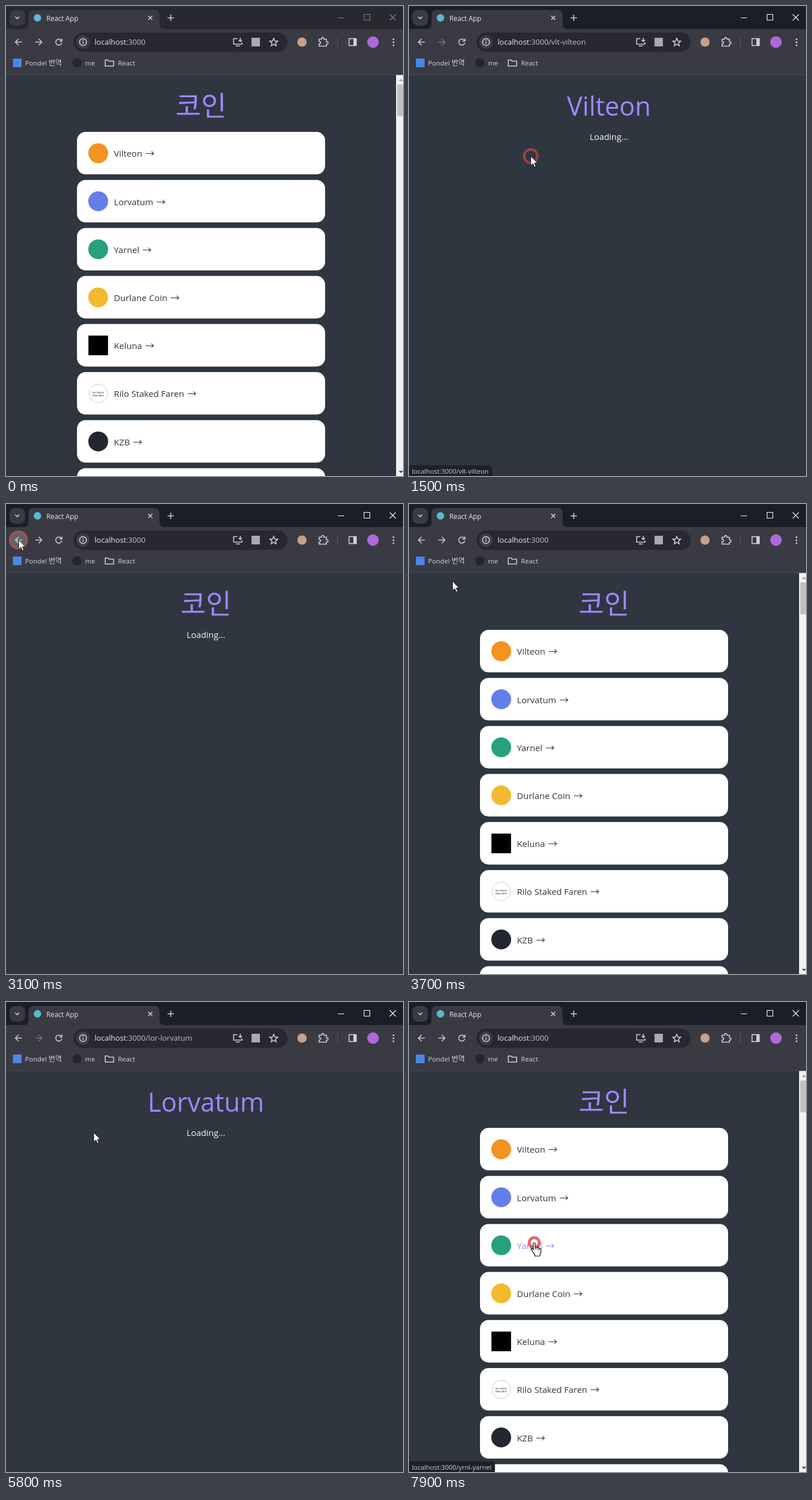
Animation of 688x814 px, one loop 8 s. Source, as an HTML page:

```html
<!DOCTYPE html>
<html lang="ko">
<head>
<meta charset="utf-8">
<title>React App</title>
<style>
html, body { margin: 0; width: 100%; height: 100%; overflow: hidden; background: #2f3640; }
svg { display: block; }
text { font-family: "Open Sans", "Noto Sans CJK KR", "Noto Sans CJK JP", sans-serif; }
.arrow { font-family: "Noto Sans CJK KR", "Noto Sans CJK JP", sans-serif; font-size: 16px; }
.line { fill: none; stroke: #d0d1d8; stroke-width: 1.6; }
.mid { text-anchor: middle; }
</style>
</head>
<body>
<svg width="688" height="814" viewBox="0 0 688 814">
  <rect width="688" height="814" fill="#2f3640"/>

  <g id="list">
    <g id="cards"></g>
    <rect x="676" y="119" width="17" height="695" fill="#f1f1f1"/>
    <rect x="678" y="136" width="13" height="55" fill="#c1c1c1"/>
    <path d="M680.5 130l4-4 4 4z" fill="#a3a3a3"/>
    <path d="M680.5 805l4 4 4-4z" fill="#505050"/>
  </g>
  <text id="head" class="mid" y="190" fill="#9c88ff"></text>
  <text id="loading" class="mid" x="346.5" y="232" font-size="14.9" fill="#f5f6fa">Loading...</text>

  <!-- tab strip -->
  <rect id="strip" width="688" height="41"/>
  <rect x="6" y="7" width="27" height="27" rx="9" fill="#3a3a43"/>
  <path class="line" d="M16 18.5l3.5 3.5 3.5-3.5"/>
  <path d="M30 40q9 0 9-9V16q0-9 9-9H257q9 0 9 9V31q0 9 9 9z" fill="#3a3a43"/>
  <circle cx="54.5" cy="20.5" r="6.5" fill="#58b9d3"/>
  <text x="70" y="26" font-size="11.8" fill="#e6e6ea">React App</text>
  <path class="line" d="M246.5 17l7 7m0-7l-7 7M280 20.5h11M285.5 15v11"/>
  <path id="winbuttons" d="M575 20.5h11M620.5 14.5h10v10h-10zM665 14.5l10.5 10.5m0-10.5l-10.5 10.5" fill="none" stroke-width="1.1"/>

  <!-- toolbar -->
  <rect y="40" width="688" height="79" fill="#3a3a43"/>
  <rect y="118.5" width="688" height="1" fill="#4a4b55"/>
  <circle id="backhover" cx="21.5" cy="62.5" r="16.5" fill="#62636b"/>
  <path class="line" d="M27.5 62.5h-11M21.8 57l-5.5 5.5 5.5 5.5"/>
  <path class="line" id="forward" d="M51 62.5h11M56.7 57l5.5 5.5-5.5 5.5"/>
  <path class="line" d="M95.7 59.2a5.3 5.3 0 1 0 1 4.5M97 56.5v4.3h-4.5"/>
  <rect x="117" y="46" width="371" height="33.5" rx="16.7" fill="#272831"/>
  <circle cx="133.5" cy="62.5" r="11.5" fill="#3d3e48"/>
  <g class="line">
    <circle cx="133.5" cy="62.5" r="6"/>
    <path d="M133.5 61.7v4M133.5 58.8v1.6"/>
    <path d="M401 56.5h-6.5v9.5h14.5v-3M398 69.2h7.5M406 55v6.5m-3-2.8l3 3 3-3"/>
    <path d="M464 56l2 4.5 4.8.4-3.7 3.2 1.1 4.8-4.2-2.5-4.2 2.5 1.1-4.8-3.7-3.2 4.8-.4z"/>
    <path d="M542.5 57.5h4.3a2.2 2.2 0 1 1 4.2 0h4.3v4.3a2.2 2.2 0 1 1 0 4.2v3.5h-12.8v-3.8a2.2 2.2 0 1 0 0-4.2z"/>
    <rect x="594.5" y="56.5" width="12.5" height="12"/>
    <path d="M172 93.5h5l1.5 2h8v8.5h-14.5z"/>
  </g>
  <text x="153.5" y="67.3" font-size="13.1" fill="#ececf0">localhost<tspan id="url" fill="#bfc0c8"></tspan></text>
  <rect x="425.5" y="55" width="14.5" height="15" fill="#a9aab2"/>
  <circle cx="513" cy="62.5" r="8" fill="#c4a08a"/>
  <rect x="574" y="55" width="1" height="15" fill="#5a5b65"/>
  <rect x="602" y="56.5" width="5" height="12" fill="#d0d1d8"/>
  <circle cx="636" cy="62.5" r="10" fill="#b069d8"/>
  <path d="M671.5 57.5h0m0 5.2h0m0 5.2h0" stroke="#d0d1d8" stroke-width="3" stroke-linecap="round"/>

  <!-- bookmarks -->
  <rect x="12" y="91" width="15" height="15" fill="#4a86e8"/>
  <circle cx="123" cy="98.5" r="8" fill="#24262d"/>
  <g font-size="11.6" fill="#d6d6dc">
    <text x="33" y="102.7">Pondel <tspan font-size="12.5">번역</tspan></text>
    <text x="137" y="102.7">me</text>
    <text x="194" y="102.7">React</text>
  </g>

  <g id="status">
    <path id="bubble" fill="#1f2029"/>
    <text id="link" x="5" y="810" font-size="11.4" fill="#d0d1d6"></text>
  </g>

  <circle id="ring" fill="none" stroke="#d8433f"/>
  <g id="cursor" fill="#fff" stroke="#000" stroke-linejoin="round">
    <path id="pointer" d="M0 0V16.5L3.9 13 6.5 19 9 18 6.5 12H11.5Z" stroke-width=".9"/>
    <g id="hand">
      <path d="M-1.7 1.5Q-1.7 0 0 0T1.7 1.5V8Q2 6.8 3.4 7T5 8.5Q5.5 7.6 6.8 8T8.2 9.8Q9 9 10.2 9.6T11.6 11.5V16Q11.6 18 10 20V23H1V20.5Q-1 18.5-2 16L-5 12Q-5.8 10.5-4.5 9.8T-1.7 12Z" stroke-width="1.2"/>
      <path d="M1.7 8v4M5 9v3.5M8.2 10v3" fill="none"/>
    </g>
  </g>
</svg>

<script>
const $ = id => document.getElementById(id);
const LOOP = 8000, STEP = 100;
const CARD = { x: 123, y: 218, w: 430, h: 73.6, pitch: 83.2 };

const coins = [
  ['Vilteon', '#f39321', 'vlt-vilteon'],
  ['Lorvatum', '#627eea', 'lor-lorvatum'],
  ['Yarnel', '#26a17b', 'yrnl-yarnel'],
  ['Durlane Coin', '#f3ba2f', 'dur-durlane-coin'],
  ['Keluna', '#000', 'kel-keluna'],
  ['Rilo Staked Faren', '#fff', 'rsf-rilo-staked-faren'],
  ['KZB', '#23272f', 'kzb-kzb'],
  ['']
];

function icon(i, y, color) {
  if (i === 4) return `<rect x="142.8" y="${y - 17}" width="34" height="34" fill="${color}"/>`;
  if (i === 5) return `<circle cx="159.8" cy="${y}" r="16" fill="${color}" stroke="#c9c9c9"/>
    <g class="mid" font-size="4" font-weight="600" fill="#555">
    <text x="159.8" y="${y}">NO IMAGE</text><text x="159.8" y="${y + 4.5}">AVAILABLE</text></g>`;
  return `<circle cx="159.8" cy="${y}" r="17.2" fill="${color}"/>`;
}

$('cards').innerHTML = coins.map(([name, color], i) => {
  const y = CARD.y + i * CARD.pitch;
  const box = `<rect x="${CARD.x}" y="${y}" width="${CARD.w}" height="${CARD.h}" rx="15" fill="#fff"/>`;
  return box + (name && icon(i, y + 37, color) +
    `<text class="name" x="187" y="${y + 43.3}" font-size="15.2">${name}<tspan class="arrow" dx="5.5">→</tspan></text>`);
}).join('');
const names = [...document.querySelectorAll('.name')];

// [start, view, coin index]
const views = [
  [0, 'list'], [1500, 'coin', 0], [3000, 'wait'], [3400, 'list'],
  [5000, 'coin', 1], [6500, 'wait'], [6600, 'list']
];

// [time, x, y] of the cursor tip
const path = [
  [0, 112, 840], [400, 112, 830], [1200, 104, 290], [1300, 104, 290], [1400, 211, 260], [1600, 211, 260],
  [2200, 170, 226], [2800, 22, 62], [3300, 22, 62], [4000, 110, 180], [4600, 232, 347],
  [5100, 232, 347], [5800, 152, 226], [6300, 15, 58], [6800, 15, 58], [7600, 190, 182],
  [7800, 217, 417], [8000, 217, 417]
];
const clicks = [1400, 2900, 4700, 6350, 7900];

function cursorAt(t) {
  const i = path.findIndex(p => p[0] > t);
  const [t0, x0, y0] = path[i - 1], [t1, x1, y1] = path[i];
  const k = (t - t0) / (t1 - t0), e = k * k * (3 - 2 * k);
  return [x0 + (x1 - x0) * e, y0 + (y1 - y0) * e];
}

function cardAt(x, y) {
  const i = Math.floor((y - CARD.y) / CARD.pitch);
  const inside = x > CARD.x && x < CARD.x + CARD.w && y - CARD.y - i * CARD.pitch < CARD.h;
  return inside && coins[i] ? i : -1;
}

const show = (id, on) => $(id).setAttribute('display', on ? 'inline' : 'none');
const set = (id, attrs) => Object.entries(attrs).forEach(([k, v]) => $(id).setAttribute(k, v));

function draw(t) {
  const [start, view, coin] = views.findLast(v => v[0] <= t);
  const isList = view === 'list', isCoin = view === 'coin';
  const [x, y] = cursorAt(t);
  const hover = isList ? cardAt(x, y) : -1;
  const active = t >= STEP;

  set('strip', { fill: active ? '#1c1e27' : '#28292f' });
  set('winbuttons', { stroke: active ? '#fff' : '#85868c' });
  show('list', isList);
  show('loading', !isList);
  $('head').textContent = isCoin ? coins[coin][0] : '코인';
  set('head', { x: isList ? 338 : 346.5, 'font-size': isCoin ? 45 : 48 });
  $('url').textContent = ':3000' + (isCoin ? '/' + coins[coin][2] : '');
  set('forward', { opacity: isCoin ? 0.4 : 1 });
  show('backhover', Math.hypot(x - 21.5, y - 62.5) < 17);
  names.forEach((n, i) => n.setAttribute('fill', i === hover ? '#9c88ff' : '#2f3640'));

  // The link bubble lingers briefly after a page opens
  const slug = hover >= 0 ? coins[hover][2] : isCoin && t - start < 300 ? coins[coin][2] : '';
  show('status', slug);
  if (slug) {
    $('link').textContent = 'localhost:3000/' + slug;
    const w = $('link').getComputedTextLength() + 11;
    set('bubble', { d: `M0 795.5H${w - 4}q4 0 4 4V814H0z` });
  }

  const age = t - (clicks.findLast(c => c <= t) ?? -LOOP);
  show('ring', age < 450);
  if (age < 450) {
    const width = 5 - age * 0.007;
    set('ring', { cx: x, cy: y, r: 11.2 + age * 0.025 - width / 2, 'stroke-width': width, opacity: 0.8 - age / 900 });
  }
  set('cursor', { transform: `translate(${x} ${y})` });
  show('hand', hover >= 0);
  show('pointer', hover < 0);
}

function tick() {
  draw(Math.floor(performance.now() % LOOP / STEP) * STEP);
  requestAnimationFrame(tick);
}
tick();
</script>
</body>
</html>
```
